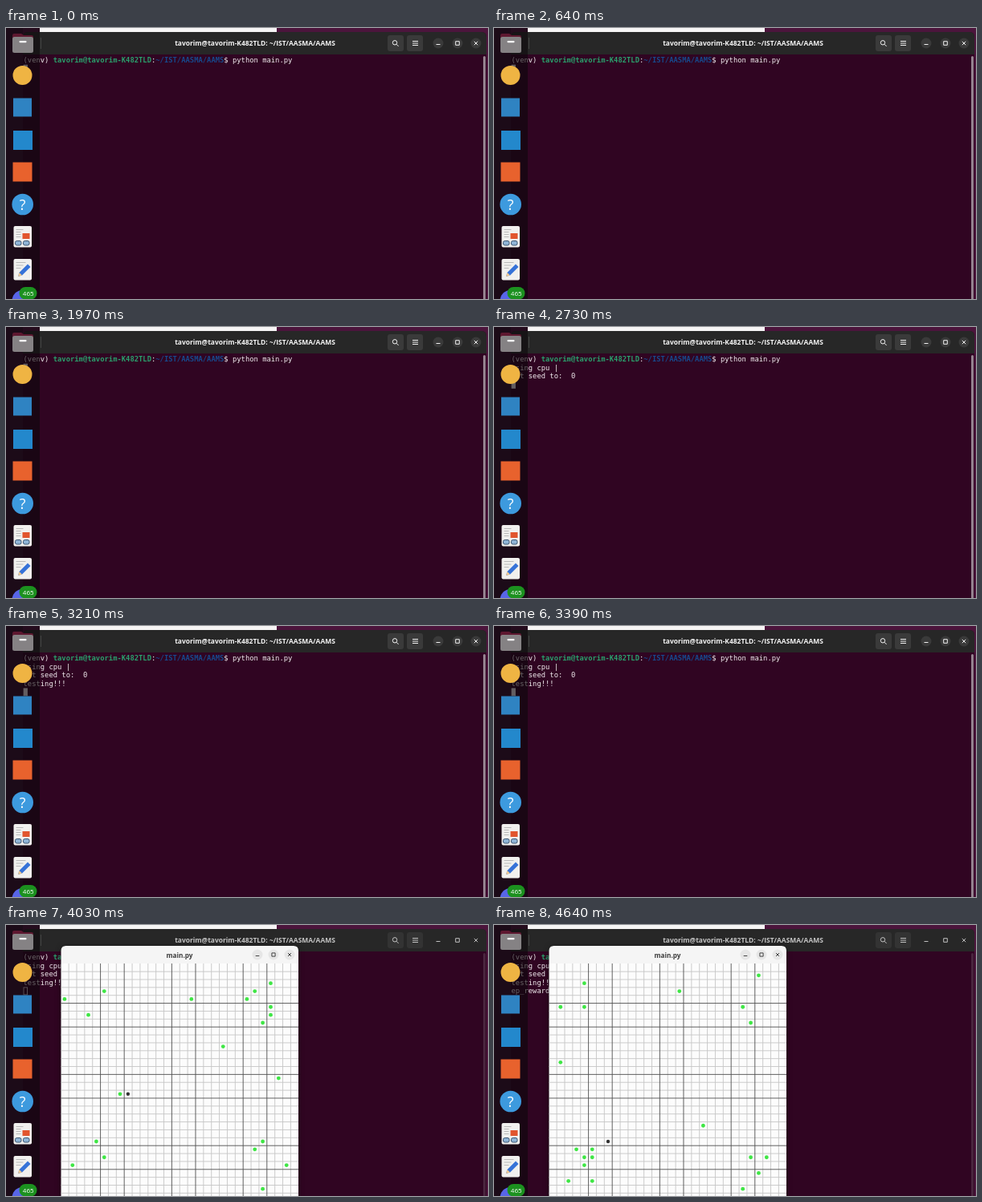
Write an HTML page that moves like this. It is 600x338 px and loops after 4.67 s.

```html
<!DOCTYPE html>
<html lang="en">
<head>
<meta charset="utf-8">
<title>Terminal run</title>
<style>
  html, body { margin: 0; width: 100%; height: 100%; overflow: hidden; background: #300522; }
  svg { display: block; width: 600px; height: 338px; }
  text { white-space: pre; }
  .mono { font: 8.83px "DejaVu Sans Mono", monospace; fill: #f2eef0; }
  .user { font-weight: 700; fill: #2aa06c; }
  .path { font-weight: 700; fill: #17498c; }
  .title { font: 700 8.45px "Open Sans", sans-serif; text-anchor: middle; }
  .glyph { fill: none; stroke: #f2f2f2; stroke-width: 1; }
  .dark { stroke: #444; }
  #bar { fill: #272727; }
  #bar-title { fill: #f4f4f4; }
  .btn { fill: #3a3a3a; }
  .blur #bar-title { fill: #c4c4c4; }
  .blur .btn { fill: #333; }
  .blur circle.btn { fill: none; }
  .blur #controls .glyph { stroke: #c0c0c0; }
  .blur #scroll { opacity: .25; }
  #cursor { fill: #e6e0e4; stroke: #e6e0e4; stroke-width: .8; }
  .blur #cursor { fill: none; }
  #app { transform-origin: 216px 344px; filter: drop-shadow(0 1px 3px rgba(0, 0, 0, .5)); }
</style>
</head>
<body>
<svg viewBox="0 0 600 338">
  <!-- desktop -->
  <rect width="600" height="338" fill="#4c153c"/>
  <rect x="42" y="-10" width="295" height="20" rx="4" fill="#f6f5f5"/>

  <!-- terminal -->
  <g id="term">
    <path d="M21 338V11q0-6 6-6H592q6 0 6 6V338Z" fill="#300522"/>
    <path id="bar" d="M21 33V11q0-6 6-6H592q6 0 6 6V33Z"/>
    <text id="bar-title" class="title" x="310" y="22">tavorim@tavorim-K482TLD: ~/IST/AASMA/AAMS</text>
    <g id="controls">
      <rect class="btn" x="475" y="9" width="20" height="20" rx="3"/>
      <rect class="btn" x="499" y="9" width="20" height="20" rx="3"/>
      <circle class="btn" cx="538" cy="19" r="6.5"/>
      <circle class="btn" cx="562" cy="19" r="6.5"/>
      <circle class="btn" cx="585" cy="19" r="6.5"/>
      <circle class="glyph" cx="484" cy="18.3" r="2.7"/>
      <path class="glyph" d="M486 20.3l2.6 2.6M506 16.5h7M506 19h7M506 21.5h7M535.5 20.5h5M559.7 16.7h4.6v4.6h-4.6zM582.8 16.8l4.4 4.4m0-4.4l-4.4 4.4"/>
    </g>
    <rect id="scroll" x="594" y="35" width="3" height="310" rx="1.5" fill="#94838f"/>
    <text class="mono" x="21.5" y="43">(venv) <tspan class="user">tavorim@tavorim-K482TLD</tspan>:<tspan class="path">~/IST/AASMA/AAMS</tspan>$ python main.py</text>
    <g id="output"></g>
    <rect id="cursor" x="22" width="4.6" height="9"/>
  </g>

  <!-- app window -->
  <g id="app">
    <path d="M68.500 344V32q0-6 6-6H358q6 0 6 6V344Z" fill="#000"/>
    <path d="M68.500 48V32q0-6 6-6H358q6 0 6 6V48Z" fill="#f5f5f5"/>
    <text class="title" x="216" y="40.500" fill="#3c3c3c" style="font-size:8.2px">main.py</text>
    <g fill="#e6e6e6">
      <circle cx="313" cy="37" r="6.5"/><circle cx="333" cy="37" r="6.5"/><circle cx="353" cy="37" r="6.5"/>
    </g>
    <path class="glyph dark" d="M310.7 38.5h4.6M330.9 34.9h4.2v4.2h-4.2zM351 35l4 4m0-4l-4 4"/>
    <g id="world">
      <rect x="68.500" y="48" width="295.500" height="296" fill="#fcfcfc"/>
      <path id="thin" stroke="#c6c6c6" stroke-width=".9"/>
      <path id="thick" stroke="#505050" stroke-width=".9"/>
      <g id="dots" fill="#3fe645"></g>
      <circle id="agent" r="2.2" fill="#333"/>
    </g>
  </g>

  <!-- dock -->
  <rect width="42" height="338" fill="#0d070b" opacity=".6"/>
  <rect width="21" height="338" fill="#150a12" opacity=".5"/>
  <path d="M43.5 12v14" stroke="#444" stroke-width="1"/>
  <path d="M8 14V9q0-2 2-2h9l3 2h10q2 0 2 2v3z" fill="#5e1830"/>
  <rect x="8" y="11" width="26" height="20" rx="2.5" fill="#858284"/>
  <rect x="16.5" y="16" width="9" height="2.2" rx="1" fill="#fff"/>
  <circle cx="20.5" cy="59" r="12" fill="#efb443"/>
  <rect x="9" y="87.5" width="23" height="23" fill="#2f83c2"/>
  <rect x="9" y="128" width="24" height="24" fill="#2388cc"/>
  <rect x="8.5" y="167.5" width="24" height="24" fill="#e8622d"/>
  <circle cx="20.7" cy="220" r="13.3" fill="#3d9ade"/>
  <text x="20.7" y="226.6" text-anchor="middle" fill="#fff" style="font:18px 'Open Sans',sans-serif">?</text>
  <g fill="#f1f0ee">
    <rect x="9.5" y="247" width="22.5" height="26.5" rx="2"/>
    <rect x="9.5" y="288" width="22.5" height="26.5" rx="2"/>
  </g>
  <rect x="20.5" y="256" width="9" height="7" fill="#e2552e"/>
  <path d="M12.5 251.5h9M12.5 254.5h6M12.5 257.5h6M12.5 260.5h6M12.5 292.5h12M12.5 296h9M12.5 299.5h6" stroke="#b9b9b9" stroke-width="1"/>
  <g fill="#8fb4d6" stroke="#3c5570" stroke-width="1">
    <rect x="11.5" y="265.5" width="7.5" height="5.5" rx="2"/><rect x="21.5" y="265.5" width="7.5" height="5.5" rx="2"/>
  </g>
  <path d="M15 310l1.5-5 10.5-10.5 3.5 3.5-10.5 10.5z" fill="#3672d8"/>
  <path d="M15 310l1.5-5 3.5 3.5z" fill="#f0c890"/>
  <circle cx="20.5" cy="340" r="13" fill="#5865e8"/>
  <rect x="16.5" y="323" width="22" height="15.5" rx="7.7" fill="#1c911f"/>
  <text x="27.7" y="333.6" text-anchor="middle" fill="#fff" style="font:8px 'Open Sans',sans-serif">465</text>
</svg>
<script>
const LOOP = 4670, OPEN = 3590, OPEN_TIME = 150, WORLD = 3790, RESET = 4360, STEP = 30;
const ROW = 10.6, CELL = 296 / 30;

const $ = id => document.getElementById(id);
const make = (parent, tag, attrs) => {
  const el = document.createElementNS('http://www.w3.org/2000/svg', tag);
  for (const k in attrs) el.setAttribute(k, attrs[k]);
  return parent.appendChild(el);
};
const show = (el, on) => { el.style.visibility = on ? 'visible' : 'hidden'; };
const place = (el, col, row) => {
  el.setAttribute('cx', 68 + (col + .5) * CELL);
  el.setAttribute('cy', 48 + (row + .5) * CELL);
};

// Printed lines with the time each appears
const lines = [
  [2100, 'using cpu |'],
  [2100, 'set seed to:  0'],
  [3100, 'testing!!!'],
  [RESET, 'ep_reward']
].map(([at, str], i) => {
  const el = make($('output'), 'text', { class: 'mono', x: 21.5, y: 43 + ROW * (i + 1) });
  el.textContent = str;
  return { at, el };
});

// Green cells of each episode, as column and row
const episodes = [
  [[26, 2], [5, 3], [24, 3], [0, 4], [16, 4], [23, 4], [26, 5], [3, 6], [26, 6], [25, 7],
   [20, 10], [27, 14], [7, 16], [4, 22], [25, 22], [24, 23], [5, 24], [1, 25], [28, 25], [25, 28]],
  [[26, 1], [4, 2], [16, 3], [1, 5], [4, 5], [24, 5], [25, 7], [1, 12], [19, 20], [3, 23],
   [5, 23], [4, 24], [5, 24], [4, 25], [25, 24], [27, 24], [26, 26], [2, 27], [5, 27], [24, 28]]
].map(cells => {
  const group = make($('dots'), 'g', {});
  for (const [col, row] of cells) place(make(group, 'circle', { r: 2.4 }), col, row);
  return group;
});

// Two lines in every nine are heavier
let thin = '', thick = '';
for (let k = 1; k < 30; k++) {
  const p = k * CELL + .25, d = `M${68 + p} 48v296M68.5 ${48 + p}h295.5`;
  if ([5, 8].includes(k % 9)) thick += d; else thin += d;
}
$('thin').setAttribute('d', thin);
$('thick').setAttribute('d', thick);

function agentCell(t) {
  const steps = from => Math.floor((t - from) / STEP);
  return t < RESET ? [Math.max(1, 15 - steps(WORLD + STEP)), 16] : [7, 13 + steps(RESET)];
}

function draw(now) {
  const t = now % LOOP;

  for (const { at, el } of lines) show(el, t >= at);
  const row = 1 + lines.filter(l => t >= l.at).length;
  $('cursor').setAttribute('y', 35.5 + ROW * row);

  const opened = t >= OPEN;
  $('term').classList.toggle('blur', opened);
  $('app').style.display = opened ? '' : 'none';
  if (opened) {
    const u = Math.min(1, (t - OPEN) / OPEN_TIME);
    const e = u < 1 ? 1 - 2 ** (-10 * u) : 1;
    $('app').style.transform = `scale(${.01 + .99 * e}, ${.05 + .95 * e})`;
    $('app').style.opacity = e;
  }

  $('world').style.display = t >= WORLD ? '' : 'none';
  show(episodes[0], t < RESET);
  show(episodes[1], t >= RESET);
  place($('agent'), ...agentCell(t));
  requestAnimationFrame(draw);
}
requestAnimationFrame(draw);
</script>
</body>
</html>
```
